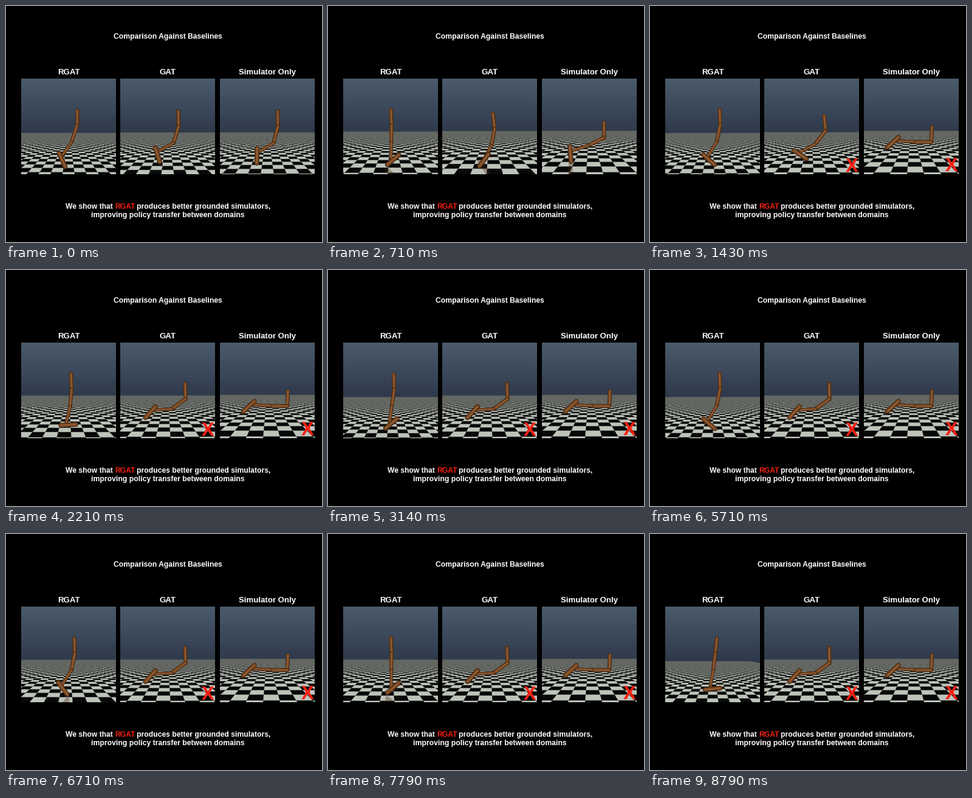
Recreate the animation shown at these times as a matplotlib script. Size 520x390 px, loop 8.87 s.

```python
import numpy as np
import matplotlib.pyplot as plt
from matplotlib.animation import FuncAnimation
from matplotlib.patches import Rectangle

W, H, DPI = 520, 390, 100
LOOP, FRAMES = 8870, 125
STEP = LOOP / (FRAMES - 1) / 1000  # seconds of motion per frame; the last pose is held
PX = 72 / DPI                      # points per pixel

# Panel box and camera: vanishing row, focal length (px), distances (m)
TOP, PW, PH = 120, 156, 158
VANISH, FOCAL, NEAR, FAR, EDGE = 198.5, 190, 3, 23, 20
TILES = 3                          # checker squares per metre
START, SPEED = 1.5, 1.25           # camera position (m) and speed (m/s)
SKY_TOP, SKY_LOW = np.array([75, 91, 108]), np.array([46, 57, 74])
DARK, BRIGHT = np.array([8, 9, 9]), np.array([190, 196, 186])
WOOD = ((70, 40, 18), (114, 67, 33), (146, 92, 50))
RED = "#fa1e10"

# Pose: hip x (from panel centre), hip y, torso, thigh, leg, foot angles, ground y.
# One hop: rise, apex, descent, landing, push-off, lift.
GAIT_PHASE = [0.03, 0.18, 0.227, 0.325, 0.48, 0.725, 0.94]
GAIT = np.array([
    [12.5, 196, -92, 101, 121, 42, 285],
    [4.5, 197, -84, 97, 100, -6, 288],
    [6, 197, -92, 98, 98, -40, 286],
    [5, 197, -93, 98, 95, -38, 277],
    [1.5, 197, -93, 91, 90, -43, 267],
    [10, 197, -92, 101, 122, 53, 269],
    [14, 197, -90, 108, 124, 66, 283],
])
FALL_B = np.array([
    [18, 199, -91, 107, 151, 73, 279],
    [23, 206, -96, 128, 152, 34, 275],
    [29.5, 213, -92, 144, 177, 132, 267],
])
FALL_C = np.array([
    [17.5, 199, -91, 105, 149, 91, 277],
    [33, 225, -88, 181, 184, 137, 258],
])


def blend(t, times, poses, period=None):
    return np.array([np.interp(t, times, col, period=period) for col in poses.T])


def gait(t):
    """Hop cycle; the first hop is a little quicker than the rest."""
    phase = np.interp(t, [0, 1.43, 8.79], [0.94, 2.03, 7.18])
    return blend(phase, GAIT_PHASE, GAIT, 1)


def stumble(t, times, poses, fade):
    """Fall through the key poses while the hopping dies away."""
    hop = np.interp(t, fade, [1, 0])
    return blend(t, times, poses) + hop * (gait(t) - gait(0))


def fall_b(t):
    return stumble(t, [0, 1.43, 1.95], FALL_B, [0.8, 1.43])


def fall_c(t):
    return stumble(t, [0, 1.0], FALL_C, [0.2, 1.0])


def wave(u, w):
    """Square wave of period 2 averaged over a width w."""
    ramp = lambda s: 1 - np.abs(s % 2 - 1)
    return (ramp(u + w / 2) - ramp(u - w / 2)) / w


ROWS = (TOP + np.arange(PH) + 0.5)[:, None]
COLS = (np.arange(PW) + 0.5 - PW / 2)[None, :]
SKY = SKY_TOP + (SKY_LOW - SKY_TOP) * np.clip((ROWS - TOP) / 90, 0, 1)[..., None]
SKY = np.broadcast_to(SKY, (PH, PW, 3))


def scene(cam, ground):
    drop = np.maximum(ROWS - VANISH, 1)
    depth = NEAR * (ground - VANISH) / drop
    x = cam + COLS * depth / FOCAL
    reach = 1.3 * TILES * depth / drop
    across = wave(x * TILES, 1.3 * TILES * depth / FOCAL)
    along = wave((depth - NEAR) * TILES, reach) * np.clip(2 - reach / 1.5, 0, 1)
    tone = (0.5 + 0.5 * across * along)[..., None]
    floor = DARK + (BRIGHT - DARK) * tone
    horizon = VANISH + (ground - VANISH) * NEAR / FAR
    cover = np.clip(ROWS - horizon + 0.5, 0, 1)
    cover = cover * np.clip((EDGE - x) * FOCAL / depth + 0.5, 0, 1)
    img = SKY + (floor - SKY) * cover[..., None]
    return np.clip(img, 0, 255).astype(np.uint8)


def joints(pose, cx):
    step = lambda deg, r: r * np.array([np.cos(np.radians(deg)), np.sin(np.radians(deg))])
    hip = np.array([cx + pose[0], pose[1]])
    top = hip + step(pose[2], 25)
    knee = hip + step(pose[3], 28.5)
    ankle = knee + step(pose[4], 31.6)
    heel, toe = ankle - step(pose[5], 8), ankle + step(pose[5], 17)
    return [(top, hip), (hip, knee), (knee, ankle), (heel, toe)]


fig = plt.figure(figsize=(W / DPI, H / DPI), dpi=DPI, facecolor="black")
ax = fig.add_axes([0, 0, 1, 1])
ax.axis("off")


def label(x, y, s, size, color="white", ha="center"):
    return ax.text(x, y, s, fontsize=size * PX, color=color, ha=ha, va="baseline",
                   family="Liberation Sans", weight="bold")


class Panel:
    widths = (6.6, 6.4, 5.4, 7.8)

    def __init__(self, x, pose, stop, cross=None):
        self.cx, self.pose, self.stop = x + PW / 2, pose, stop
        self.img = ax.imshow(np.zeros((PH, PW, 3), np.uint8), aspect="auto",
                             extent=(x, x + PW, TOP + PH, TOP), interpolation="nearest")
        self.clip = Rectangle((x, TOP), PW, PH, transform=ax.transData)
        self.mirror = self.line(7.5, WOOD[0], 0.35)
        self.limbs = [[self.line(w * k, c) for k, c in zip((1, 0.72, 0.3), WOOD)]
                      for w in self.widths]
        self.cap = self.line(3.2, (160, 118, 84))
        self.cross = None
        if cross:
            cx, base, self.since = cross
            self.cross = label(cx, base, "X", 31, RED)
            self.cross.set_zorder(5)

    def line(self, width, color, alpha=1):
        ln, = ax.plot([], [], lw=width * PX, color=np.array(color) / 255, alpha=alpha,
                      solid_capstyle="round", zorder=3)
        ln.set_clip_path(self.clip)
        return ln

    def draw(self, t):
        pose = self.pose(t)
        ground = pose[6]
        self.img.set_data(scene(START + SPEED * min(t, self.stop), ground))
        parts = joints(pose, self.cx)
        for (a, b), lines in zip(parts, self.limbs):
            for ln in lines:
                ln.set_data([a[0], b[0]], [a[1], b[1]])
        top = parts[0][0]
        self.cap.set_data([top[0], top[0]], [top[1] - 1, top[1] - 1])
        a, b = parts[3]
        self.mirror.set_data([a[0], b[0]], [2 * ground - a[1], 2 * ground - b[1]])
        if self.cross:
            self.cross.set_visible(t >= self.since)


panels = [
    Panel(25, gait, 9),
    Panel(188, fall_b, 1.95, (332, 274, 1.2)),
    Panel(352, fall_c, 1.0, (496, 273, 1.0)),
]

label(266.3, 54, "Comparison Against Baselines", 12.1)
for x, name in ((103.5, "RGAT"), (266.3, "GAT"), (430, "Simulator Only")):
    label(x, 113, name, 13.2)
label(97.5, 335, "We show that", 12.1, ha="left")
label(179.3, 335, "RGAT", 12.1, RED, "left")
label(435.5, 335, "produces better grounded simulators,", 12.1, ha="right")
label(266.3, 349.5, "improving policy transfer between domains", 12.1)

ax.set_xlim(0, W)
ax.set_ylim(H, 0)


def update(i):
    t = min(i, FRAMES - 2) * STEP
    for p in panels:
        p.draw(t)
    return []


anim = FuncAnimation(fig, update, frames=FRAMES, interval=LOOP / FRAMES,
                     init_func=lambda: update(0), repeat=True, repeat_delay=0)
plt.show()
```
